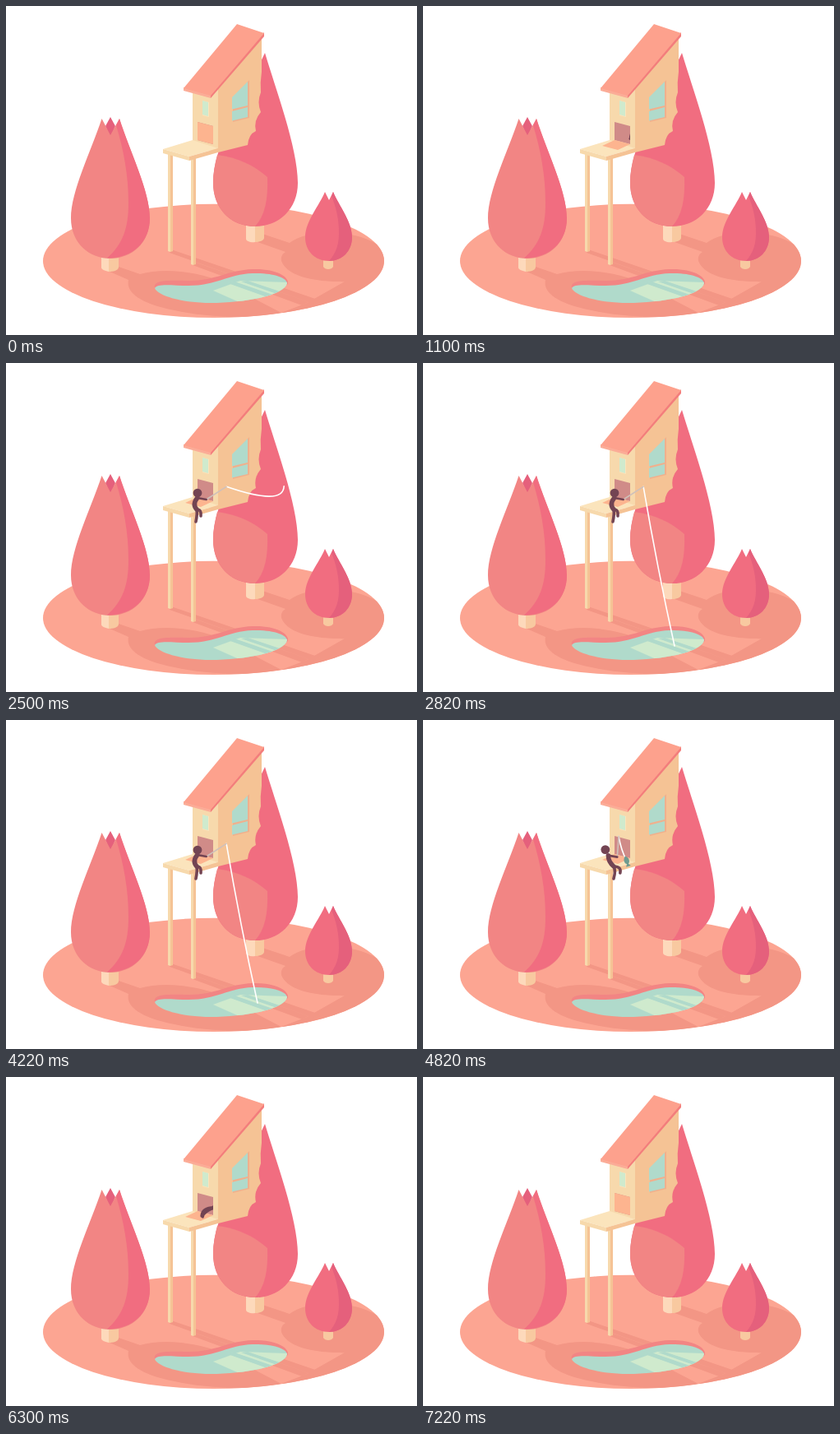
An HTML page that plays this animation: 500 by 400 pixels, repeating every 8520 ms.

```html
<!DOCTYPE html>
<html lang="en">
<head>
<meta charset="utf-8">
<title>Tree house fishing</title>
<style>
html, body { margin: 0; width: 100%; height: 100%; overflow: hidden; background: #fff; }
svg { display: block; width: 100%; height: 100%; }
.ground { fill: #fca592; }
.shade { fill: #f39685; }
.rose { fill: #f28584; }
.pink { fill: #f16d80; }
.berry { fill: #e5607c; }
.cream { fill: #fbe4bc; }
.sand { fill: #f7d9ac; }
.tan { fill: #f5c395; }
.trunk { fill: #fdd9bb; }
.bark { fill: #f8c9a0; }
.water { fill: #b0dacb; }
.light { fill: #cfeacd; }
.roof { fill: #fda18d; }
.eave { fill: #f37d7c; }
.brow { fill: #fbac97; }
.stroke { fill: none; stroke-linecap: round; stroke-linejoin: round; }
#body { stroke: #734453; }
</style>
</head>
<body>
<svg viewBox="0 0 500 400">
  <defs>
    <clipPath id="island"><ellipse cx="252.5" cy="309.9" rx="207.5" ry="69.1"/></clipPath>
    <clipPath id="pond"><path d="M181 343C184 337 202 340 222 340C256 340 270 326 300 325C326 324 342 331 342 337C339 352 290 361 249 361C214 361 184 352 181 343Z"/></clipPath>
    <clipPath id="outside"><path d="M0 0H252V168L262 171V400H0Z"/></clipPath>
  </defs>

  <g clip-path="url(#island)">
    <rect class="ground" x="40" y="235" width="425" height="150"/>
    <path class="shade" d="M124 322L149 333C145 350 168 363 205 370C240 378 300 382 335 373L262 335C238 325 195 317 163 326L137 317Z"/>
    <path class="shade" d="M306 275L345 288C365 272 420 270 452 290L475 310L450 335C400 337 345 336 335 310C334 304 337 301 340 299L306 287Z"/>
    <path class="shade" d="M412 335H460L400 390L335 373L366 361Z"/>
    <path class="shade" d="M201 296L382 358L374 362L199 300ZM229 311L368 360L360 364L227 315Z"/>
  </g>

  <path class="rose" d="M181 343C178 332 202 334 222 334C256 334 270 321 300 320C328 319 345 329 343 338L330 346L190 349Z"/>
  <g clip-path="url(#pond)">
    <rect class="water" x="178" y="318" width="168" height="46"/>
    <path class="light" d="M252 346L285 334L343 336V350L288 362Z"/>
    <path class="water" d="M278 335L336 355L329 358L270 337ZM294 334L342 350L338 353L286 335Z"/>
  </g>

  <path class="trunk" d="M292 262H303V287C298 288 292 286 292 283Z"/>
  <path class="bark" d="M303 262H314V282C314 285 308 287 303 287Z"/>
  <path class="pink" d="M315 57C327 98 355 172 355 215C355 247 332 268 303 268C274 268 252 247 252 215C252 170 285 120 315 57Z"/>
  <path class="rose" d="M257 181C282 184 302 194 318 208C319 235 315 255 303 268C274 268 252 247 252 215C252 204 254 193 257 181Z"/>

  <path class="trunk" d="M116 300H125V323C120 322 116 320 116 318Z"/>
  <path class="bark" d="M125 300H137V318C136 322 130 323 125 323Z"/>
  <path class="berry" d="M121 146L127 135L133 146L127 160Z"/>
  <path class="rose" d="M116.500 137L127 157L138 137C151 178 175 225 175 258C175 288 153 307 127 307C101 307 79 288 79 258C79 225 103 178 116.500 137Z"/>
  <path class="pink" d="M138 137C151 178 175 225 175 258C175 288 153 307 123 306.500C142 290 149 270 149 240C149 205 143 175 134 145Z"/>

  <path class="bark" d="M386 305H398V317C396 321 388 321 386 317Z"/>
  <path class="pink" d="M388 226L393 236L398 226C405 243 421 262 421 281C421 298 409 310 393 310C376 310 364 298 364 281C364 262 381 243 388 226Z"/>
  <path class="berry" d="M398 226C405 243 421 262 421 281C421 298 409 310 393 310C402 300 405 289 405 276C405 260 402 246 396 231Z"/>

  <path class="sand" d="M197 178H200V299L197 298ZM225 184H228V315L225 314Z"/>
  <path class="tan" d="M200 178H203V298L200 299ZM228 184H231V314L228 315Z"/>

  <path class="tan" d="M258 98L311 35V80Q309 93 310 105Q305 117 310 129Q301 139 304 152Q295 156 294 169L258 178Z"/>
  <path class="sand" d="M227 98H258V178L227 170Z"/>
  <path fill="#f0b08d" d="M276 111L296 90V136L276 141Z"/>
  <path class="water" d="M275 111L294 92V121L275 125.500ZM275 128L294 123V135L275 139.500Z"/>
  <path class="cream" d="M239 115L247 117V135L239 133Z"/>
  <path class="light" d="M239 115L246 117V134L239 132Z"/>
  <path class="brow" d="M216 99L249 108V112L216 103Z"/>
  <path class="eave" d="M249 108L314 32V37L249 112Z"/>
  <path class="roof" d="M281 22L314 33L249 109L216 100Z"/>

  <path class="cream" d="M191 174L227 163L258 173L223 183Z"/>
  <path class="sand" d="M191 174L223 183V188L191 179Z"/>
  <path class="tan" d="M223 183L258 173V178L223 188Z"/>
  <path fill="#d08b88" d="M233 141L252 146V168L233 163Z"/>
  <path id="door" fill="#fdb48f"/>

  <path id="line" class="stroke" stroke="#fff" stroke-width="1.600"/>
  <path id="rod" class="stroke" stroke="#cfc0ba" stroke-width="1.600"/>
  <g id="body" clip-path="url(#outside)">
    <path id="legs" class="stroke" stroke-width="3.600"/>
    <path id="torso" class="stroke" stroke-width="5.500"/>
    <path id="arm" class="stroke" stroke-width="2.600"/>
    <circle id="head" r="5.400" fill="#734453" stroke="none"/>
  </g>
  <path id="fish" fill="#6f9b90" d="M6 0C3-4-2-4-4-1L-7-3V3L-4 1C-2 4 3 4 6 0Z"/>
</svg>

<script>
const LOOP = 8520, STEP = 40, OFFSET = 20;
const SEAT = [232, 178], BACKSWING = [250, 100], SPLASH = [306, 344], MOUTH = [216, 164];

const el = id => document.getElementById(id);
const setPath = (id, d) => el(id).setAttribute('d', d);
const show = (id, on) => { el(id).style.display = on ? '' : 'none'; };

const add = ([x, y], dx, dy) => [x + dx, y + dy];
const mix = (a, b, u) => a.map((v, i) => v + (b[i] - v) * u);
const polar = (p, angle, length) => add(p, Math.sin(angle) * length, -Math.cos(angle) * length);
const bezier = (a, b, c, u) => mix(mix(a, b, u), mix(b, c, u), u);

const progress = (t, from, to) => Math.min(1, Math.max(0, (t - from) / (to - from)));
const ease = (t, from, to) => {
  const u = progress(t, from, to);
  return u * u * (3 - 2 * u);
};

function drawDoor(t) {
  const angle = (ease(t, 660, 1020) - ease(t, 6660, 7180)) * Math.PI / 2;
  const x = -15 * Math.sin(angle), y = 7 * Math.sin(angle) - 22 * Math.cos(angle);
  setPath('door', `M233 163L252 168L${252 + x} ${168 + y}L${233 + x} ${163 + y}Z`);
}

// Returns the hand that holds the rod
function drawBody(t, lean) {
  const hidden = 1 - ease(t, 860, 1540) + progress(t, 5940, 6460) ** 2;
  const trail = Math.sin(Math.PI * hidden);   // legs drag behind while passing the door
  const hip = add(SEAT, 44 * hidden, -40 * hidden);
  const angle = .05 - .55 * lean + 1.2 * trail;
  const shoulder = polar(hip, angle, 14 + lean);
  const back = add(mix(hip, shoulder, .5), -6 + 3 * lean + 6 * trail, 1);
  const hand = add(shoulder, 11, 2);

  const leg = (knee, foot) => `M${hip}Q${add(hip, ...knee)} ${add(hip, ...foot)}`;
  el('head').setAttribute('transform', `translate(${polar(hip, angle, 20 + 3 * lean)})`);
  setPath('torso', `M${shoulder}Q${back} ${hip}`);
  setPath('legs', leg([6 + 4 * lean - 20 * trail, 0], [5 + 3 * lean - 20 * trail, 8 + 2 * trail])
    + leg([1 + 2 * lean - 14 * trail, 5], [-1 + lean - 13 * trail, 15 - 4 * trail]));
  setPath('arm', `M${shoulder}L${hand}`);
  return hand;
}

function drawTackle(t, hand, lean) {
  const held = ease(t, 1600, 1800) - ease(t, 5700, 5900);
  const reach = ease(t, 1820, 2260) - ease(t, 5540, 5700);
  const cast = progress(t, 2260, 2820);
  const reel = progress(t, 4560, 5400);

  const tip = polar(hand, 1 - lean, held * (29 - 4 * lean));
  const flight = reel > 0
    ? bezier(SPLASH, [190, -20], MOUTH, reel)
    : bezier(BACKSWING, [409, 110], SPLASH, cast);
  const end = mix(tip, flight, reach);
  const slack = Math.sin(Math.PI * cast);
  const bend = add(mix(tip, end, .5), 36 * slack - 2 * cast, 24 * slack + 2 * cast);

  show('rod', held > 0);
  setPath('rod', `M${hand}L${tip}`);
  show('line', reach > 0);
  setPath('line', `M${tip}Q${bend} ${end}`);

  const size = progress(reel, 0, .1) - ease(t, 5540, 5700);
  const heading = Math.atan2(tip[1] - end[1], tip[0] - end[0]) * 180 / Math.PI;
  show('fish', size > 0);
  el('fish').setAttribute('transform', `translate(${end}) rotate(${heading}) scale(${size})`);
}

const start = performance.now();

function render() {
  const elapsed = (performance.now() - start) % LOOP;
  const t = Math.floor((elapsed - OFFSET) / STEP) * STEP + OFFSET;
  const lean = ease(t, 1580, 1900) - ease(t, 2100, 2420) + ease(t, 4400, 4900) - ease(t, 5660, 5940);
  drawDoor(t);
  drawTackle(t, drawBody(t, lean), lean);
  requestAnimationFrame(render);
}
render();
</script>
</body>
</html>
```
